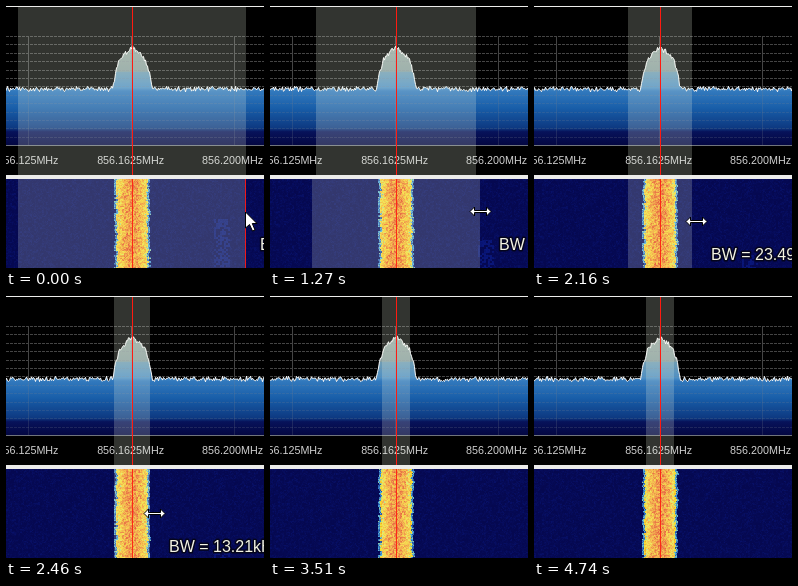
An HTML page with a canvas for the animation above (4.82 s loop, 258 px wide and 262 px high).

```html
<!DOCTYPE html>
<html lang="en">
<head>
<meta charset="utf-8">
<title>Filter bandwidth</title>
<style>
  html, body { margin: 0; width: 100%; height: 100%; overflow: hidden; background: #000; }
  canvas { display: block; }
</style>
</head>
<body>
<canvas id="view" width="258" height="262"></canvas>
<script>
const W = 258, H = 262, LOOP = 4820;
const MID = 126, FLOOR = 83, BASE = 140, FALL = 173;
const PX_PER_KHZ = 2.725;
const DRAG_START = 5, POINTER_END = 26;

// Drag key points: step, half width in the spectrum, half width in the waterfall
const drag = [[4, 114, 114], [9, 80, 84], [13, 41, 41], [18, 18, 18], [21, 14, 14]];
const peak = [[0, 42], [8, 35], [13, 29], [17, 16], [20, 0]];
const heat = [[0, 5, 8, 80], [.2, 10, 25, 130], [.4, 80, 175, 225], [.5, 225, 230, 90],
  [.58, 248, 222, 45], [.75, 245, 160, 45], [1, 225, 40, 25]];

const ctx = document.getElementById('view').getContext('2d');
const fall = ctx.createImageData(W, H - FALL);

const fill = ctx.createLinearGradient(0, 30, 0, BASE);
[[0, '#a0aea4'], [.32, '#8a9f9e'], [.33, '#6f9cb4'], [.47, '#4f90c4'], [.5, '#3279bd'],
 [.66, '#185da8'], [.84, '#0d3880'], [.87, '#07125a'], [1, '#030640']]
  .forEach(stop => fill.addColorStop(...stop));

// Refresh moments: a steady beat that lags slightly while the drag begins
const stepTime = k => 135 * k + 45 * Math.exp(-(((k - 8) / 3) ** 2));

function rand(a, b) {
  let h = Math.imul(a + 7919, 374761393) ^ Math.imul(b + 104729, 668265263);
  h = Math.imul(h ^ (h >>> 13), 1274126177);
  h = Math.imul(h ^ (h >>> 16), 2246822519);
  return ((h ^ (h >>> 15)) >>> 0) / 4294967296;
}

// Piecewise linear lookup of column k in rows sorted by column 0
function lookup(rows, v, k = 1) {
  let i = 1;
  while (i < rows.length - 1 && rows[i][0] < v) i++;
  const a = rows[i - 1], b = rows[i];
  const t = Math.min(1, Math.max(0, (v - a[0]) / (b[0] - a[0])));
  return a[k] + (b[k] - a[k]) * t;
}

function rect(x, y, w, h, color) {
  ctx.fillStyle = color;
  ctx.fillRect(x, y, w, h);
}

function shape(points, x, y) {
  ctx.beginPath();
  points.forEach(([px, py]) => ctx.lineTo(x + px, y + py));
  ctx.closePath();
  ctx.lineWidth = 1;
  ctx.lineJoin = 'miter';
  ctx.fillStyle = '#fff';
  ctx.strokeStyle = '#000';
  ctx.fill();
  ctx.stroke();
}

function drawGrid(color) {
  ctx.strokeStyle = color;
  ctx.lineWidth = 1;
  ctx.setLineDash([3, 1]);
  ctx.beginPath();
  for (let y = 30; y < BASE - 1; y += 8.4) {
    ctx.moveTo(0, Math.round(y) + .5);
    ctx.lineTo(W, Math.round(y) + .5);
  }
  ctx.stroke();
  ctx.setLineDash([]);
  for (const x of [22, 125, 228]) rect(x, 30, 1, BASE - 30, color);
}

function traceY(x, step) {
  const spread = (rand(x, step) - .5) * 4 + (rand(x + 1, step + 50) - .5) * 2;
  return FLOOR - lookup(peak, Math.abs(x - MID)) + spread;
}

function drawSpectrum(step, half) {
  rect(0, 0, W, FALL, '#000');
  drawGrid('#444');

  const line = new Path2D();
  for (let x = -1; x <= W; x++) line.lineTo(x + .5, traceY(x, step));
  const area = new Path2D(line);
  area.lineTo(W, BASE);
  area.lineTo(-1, BASE);
  ctx.fillStyle = fill;
  ctx.fill(area);
  ctx.save();
  ctx.clip(area);
  drawGrid('rgba(120,130,140,.22)');
  ctx.restore();
  ctx.lineJoin = 'round';
  ctx.strokeStyle = '#fff';
  ctx.stroke(line);
  rect(0, BASE - 1, W, 1, '#70747c');

  ctx.font = '10.75px "Liberation Sans", Arial, sans-serif';
  ctx.textAlign = 'center';
  ctx.fillStyle = '#cfcfcf';
  ctx.fillText('856.125MHz', 22, 158);
  ctx.fillText('856.1625MHz', 124.6, 158);
  ctx.fillText('856.200MHz', 226.6, 158);

  rect(MID - half, 0, half * 2, 169, 'rgba(235,245,225,.21)');
  rect(MID, 0, 1, 169, '#ff1a10');
  rect(0, 0, W, 1, '#ececea');
  rect(0, 169, W, 4, '#ececea');
}

function level(x, row, y, step) {
  const d = Math.abs(x - MID + .3), n = rand(x, row);
  const blob = rand(x >> 1, (row >> 1) + 300);
  const edge = 14.5 + rand(row >> 1, x < MID ? 5 : 6) * 2;
  if (d < edge) return .8 - .24 * (d / 15) ** 2 + (n + blob - 1) * .2;
  if (d < edge + 2) return .25 + n * .2;
  const burst = x > 207 && x < 224 && y > 39 + step * 2.4 && blob > .4;
  return burst ? .12 + n * .06 : n * blob * .1;
}

function drawWaterfall(step, half) {
  for (let y = 0, p = 0; y < fall.height; y++) {
    for (let x = 0; x < W; x++, p += 4) {
      const v = level(x, y - step * 2, y, step);
      for (let c = 0; c < 3; c++) fall.data[p + c] = lookup(heat, v, c + 1);
      fall.data[p + 3] = 255;
    }
  }
  ctx.putImageData(fall, 0, FALL);
  rect(MID - half, FALL, half * 2, H - FALL, 'rgba(235,245,225,.2)');
  rect(MID, FALL, 1, H - FALL, '#ff2a12');
}

function drawPointer(step, half, fallHalf) {
  const hover = step < DRAG_START;
  const shift = hover ? -1 : 4;
  const x = MID + half + shift;
  const y = Math.round(Math.min(217, Math.max(205, 221 - half * .2)));
  const label = `BW = ${(fallHalf * 2 / PX_PER_KHZ).toFixed(2)}kHz`;

  ctx.font = '16px "Liberation Sans", Arial, sans-serif';
  ctx.textAlign = 'left';
  ctx.lineJoin = 'round';
  ctx.lineWidth = 3;
  ctx.strokeStyle = '#05051c';
  ctx.fillStyle = '#f4f4e4';
  const tx = MID + fallHalf + shift + 15, ty = y + 39;
  ctx.strokeText(label, tx, ty);
  ctx.fillText(label, tx, ty);

  if (hover) {
    rect(MID + half - 1, FALL, 1, H - FALL, '#f01818');
    shape([[0, 0], [0, 16], [4, 12.5], [7, 19], [9.5, 18], [6.8, 11.5], [11.5, 11.5]], x + .5, y + 1);
  } else {
    const side = [[-10.5, 0], [-6, -4.5], [-6, -1]];
    const mirror = s => s.map(([a, b]) => [-a, b]).reverse();
    const top = [...side, ...mirror(side)];
    const bottom = mirror(top).map(([a, b]) => [-a, -b]);
    shape([...top, ...bottom], x + .5, y + .5);
  }
}

function draw(step) {
  const half = Math.round(lookup(drag, step));
  const fallHalf = Math.round(lookup(drag, step, 2));
  drawSpectrum(step, half);
  drawWaterfall(step, fallHalf);
  if (step < POINTER_END) drawPointer(step, half, fallHalf);
}

let start, shown = -1;
function tick(now) {
  start ??= now;
  const t = (now - start) % LOOP;
  let step = 0;
  while (stepTime(step + 1) <= t) step++;
  if (step !== shown) draw(shown = step);
  requestAnimationFrame(tick);
}
requestAnimationFrame(tick);
</script>
</body>
</html>
```
